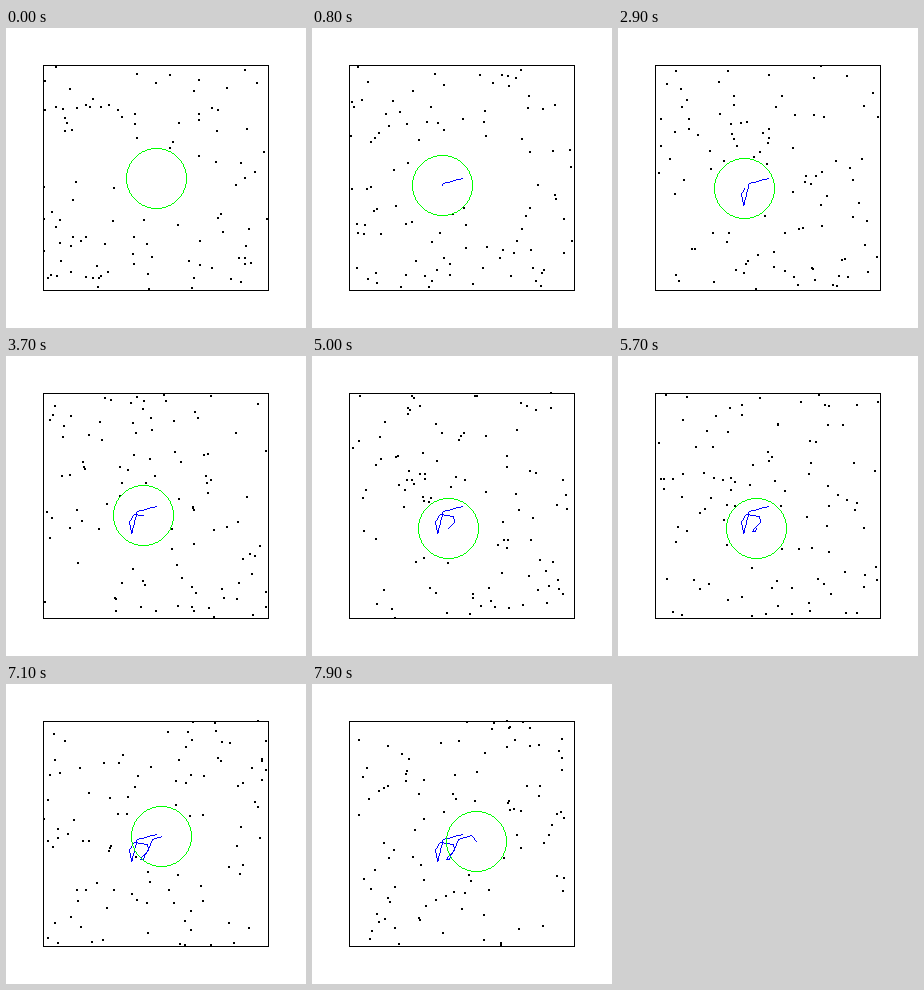
Animation of 300x300 px, one loop 8 s. Source, as a matplotlib script:

```python
import numpy as np
import matplotlib.pyplot as plt
from matplotlib.animation import FuncAnimation

SIZE, DPI = 300, 100
FRAMES, INTERVAL = 80, 100
LOW, HIGH = 37, 262          # walls of the box
RADIUS = 30                  # radius of the disc
COUNT, SPEED = 100, 3.2      # gas particles
WHITE, BLACK = (255, 255, 255), (0, 0, 0)
GREEN, BLUE = (0, 255, 0), (0, 0, 255)

# Kicks that turn the disc: step, x, y; it drifts evenly in between
KICKS = [
    (0, 150, 150), (7, 131, 155), (18, 125, 177), (27, 123, 165),
    (30, 128, 158), (40, 141, 160), (43, 142, 166), (50, 136, 172),
    (53, 134, 175), (56, 137, 175), (64, 146, 155), (74, 159, 151),
    (79, 164, 157),
]


def disc_path():
    steps = np.arange(FRAMES)
    t, x, y = np.transpose(KICKS)
    return np.column_stack([np.interp(steps, t, x), np.interp(steps, t, y)])


def start_particles(rng, centre):
    pos = rng.uniform(LOW, HIGH, (4 * COUNT, 2))
    outside = np.hypot(*(pos - centre).T) > RADIUS + 1
    return pos[outside][:COUNT], rng.normal(0, SPEED, (COUNT, 2))


def bounce_off_walls(pos, vel):
    for wall, side in ((LOW, -1), (HIGH, 1)):
        hit = side * (pos - wall) > 0
        pos[hit] = 2 * wall - pos[hit]
        vel[hit] *= -1


def bounce_off_disc(pos, vel, centre, drift):
    offset = pos - centre
    dist = np.hypot(*offset.T)[:, None]
    normal = offset / np.maximum(dist, 1e-9)
    inside = dist < RADIUS
    approach = np.sum((vel - drift) * normal, axis=1, keepdims=True)
    pos += np.where(inside, 2 * (RADIUS - dist) * normal, 0)
    vel -= np.where(inside & (approach < 0), 2 * approach * normal, 0)


def simulate(path):
    pos, vel = start_particles(np.random.default_rng(12), path[0])
    history = [pos.copy()]
    for before, centre in zip(path, path[1:]):
        pos += vel
        bounce_off_walls(pos, vel)
        bounce_off_disc(pos, vel, centre, centre - before)
        bounce_off_walls(pos, vel)
        history.append(pos.copy())
    return to_pixels(history)


def to_pixels(points):
    return np.rint(points).astype(int)


def ring_pixels(radius):
    """One-pixel circle: one octant, mirrored into the other seven."""
    x = np.arange(int(radius / np.sqrt(2)) + 1)
    y = to_pixels(np.sqrt(radius**2 - x**2))
    xs, ys = np.r_[x, y], np.r_[y, x]
    return np.column_stack([np.r_[xs, xs, -xs, -xs], np.r_[ys, -ys, ys, -ys]])


def plot(canvas, points, colour):
    x, y = np.transpose(points)
    canvas[y, x] = colour


def draw_line(canvas, start, end, colour):
    count = np.abs(end - start).max() + 1
    plot(canvas, to_pixels(np.linspace(start, end, count)), colour)


def draw_box(canvas):
    for edge in (LOW, HIGH):
        canvas[edge, LOW:HIGH + 1] = BLACK
        canvas[LOW:HIGH + 1, edge] = BLACK


path = disc_path()
particles = simulate(path)
trail = to_pixels(path)
ring = ring_pixels(RADIUS)


def render(i):
    canvas = np.full((SIZE, SIZE, 3), WHITE, dtype=np.uint8)
    draw_box(canvas)
    for dx in (-1, 0):
        for dy in (-1, 0):
            plot(canvas, particles[i] + (dx, dy), BLACK)
    for start, end in zip(trail[:i], trail[1:i + 1]):
        draw_line(canvas, start, end, BLUE)
    plot(canvas, trail[i] + ring, GREEN)
    return canvas


fig = plt.figure(figsize=(SIZE / DPI, SIZE / DPI), dpi=DPI, facecolor="white")
ax = fig.add_axes([0, 0, 1, 1])
ax.axis("off")
image = ax.imshow(render(0), interpolation="nearest", aspect="auto")


def draw(i):
    image.set_data(render(i))
    return [image]


anim = FuncAnimation(fig, draw, frames=FRAMES, interval=INTERVAL,
                     repeat=True, repeat_delay=0)
plt.show()
```
